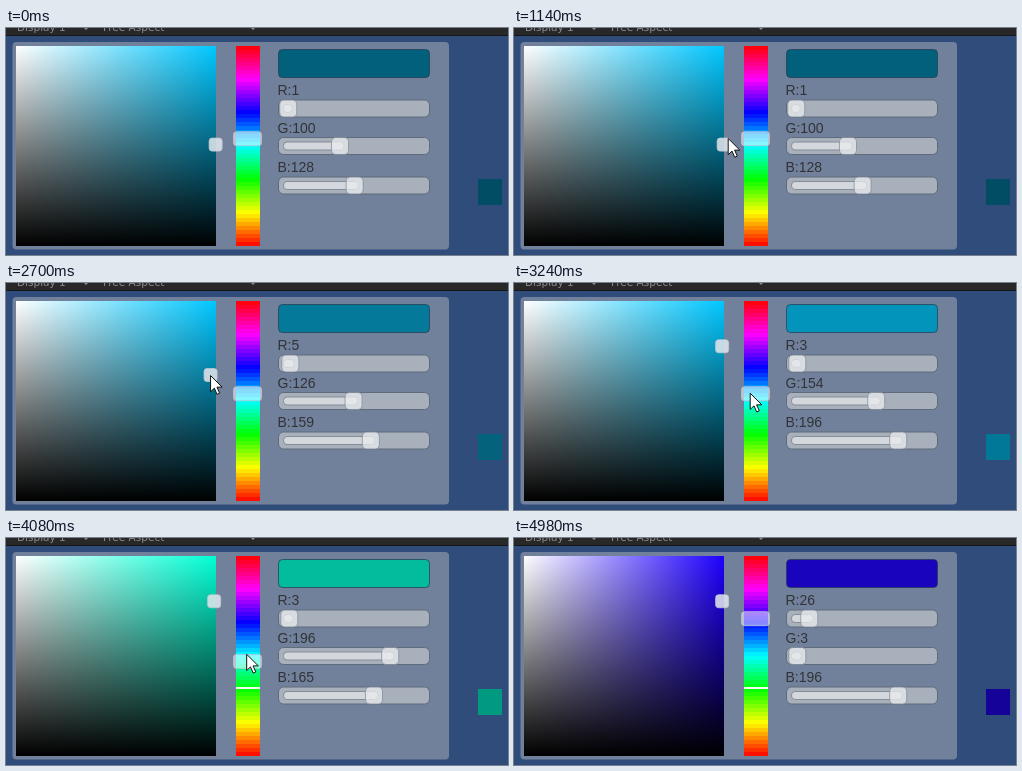
These frames come from a looping animation (502x227 px, 5.4 s). An HTML page:

```html
<!DOCTYPE html>
<html lang="en">
<head>
<meta charset="utf-8">
<title>Color picker</title>
<style>
  html, body { margin: 0; width: 100%; height: 100%; overflow: hidden; background: #304c7a; }
  svg { display: block; width: 502px; height: 227px; }
  text { font: 14px "Liberation Sans", Arial, sans-serif; fill: #323338; }
  .bar text { font: 10.5px "DejaVu Sans", sans-serif; fill: #8c8c8c; }
  .track { fill: #a8b0bb; stroke: #5f6b7b; }
  .fill { fill: #d4d7db; stroke: #858d98; }
  .knob { fill: #e9ecef; fill-opacity: .75; stroke: #7d8794; stroke-opacity: .7; }
  .handle { fill: #dfe4ea; fill-opacity: .88; stroke: #c3cad3; stroke-opacity: .8; }
  #hueKnob { fill: #fff; fill-opacity: .53; stroke: #b9c6d4; }
</style>
</head>
<body>
<svg viewBox="0 0 502 227">
  <defs>
    <linearGradient id="white"><stop stop-color="#fff"/><stop offset="1" stop-color="#fff" stop-opacity="0"/></linearGradient>
    <linearGradient id="black" x2="0" y2="1"><stop stop-opacity="0"/><stop offset="1"/></linearGradient>
  </defs>
  <rect width="502" height="227" fill="#304c7a"/>
  <g class="bar">
    <rect width="502" height="8" fill="#282828"/>
    <rect y="7" width="502" height="1" fill="#161616"/>
    <text x="11" y="3">Display 1</text>
    <text x="97" y="3">Free Aspect</text>
    <path d="M78 0h4l-2 2zM245 0h4l-2 2z" fill="#8c8c8c"/>
  </g>
  <rect x="6.5" y="14" width="436.5" height="207.5" rx="4" fill="#71819b"/>
  <rect id="hueBase" x="10" y="18" width="200" height="200"/>
  <rect x="10" y="18" width="200" height="200" fill="url(#white)"/>
  <rect x="10" y="18" width="200" height="200" fill="url(#black)"/>
  <g id="hueBar" shape-rendering="crispEdges"></g>
  <rect id="trace" x="230" y="149" width="24" height="2" fill="#f2fdf0"/>
  <rect id="preview" x="272.5" y="21.5" width="151" height="28" rx="4" stroke="#26384f" stroke-opacity=".7"/>
  <g id="sliders"></g>
  <rect id="cube" x="472" y="151" width="24" height="26"/>
  <rect id="hueKnob" class="handle" x="227.5" y="-7" width="28" height="14" rx="3"/>
  <rect id="knob" class="handle" x="-6.5" y="-6.5" width="13" height="13" rx="3"/>
  <path id="cursor" d="M.5.5v16.2l3.8-3.6 2.7 6.2 2.6-1.2-2.7-6h5.2z" fill="#fff" stroke="#111"/>
</svg>
<script>
const LOOP = 5400, STEP = 60, TOP = 18, LEFT = 10, SIZE = 200;
const $ = id => document.getElementById(id);
const clamp = (v, lo, hi) => Math.min(hi, Math.max(lo, v));

// Pointer moves: start time, end time, destination x and y.
const moves = [
  [120, 720, 163, 113],        // enter
  [720, 960, 213, 111],        // reach the square's handle
  [1620, 1980, 153.24, 101.92], [1980, 2220, 174, 79], [2220, 2580, 203.35, 93.06],
  [2700, 2940, 206.94, 64.27], // drag ends
  [3120, 3240, 235, 110.73],   // reach the hue handle
  [3360, 3600, 235, 140.8], [3840, 4140, 240, 114], [4260, 4380, 242, 92.96],
  [4380, 4560, 243, 80.69],    // drag ends
  [4620, 4860, 410, 72]        // leave
];

function pointerAt(t) {
  let x = 490, y = 42;
  for (const [from, to, toX, toY] of moves) {
    const p = clamp((t - from) / (to - from), 0, 1), ease = p * p * (3 - 2 * p);
    x += (toX - x) * ease;
    y += (toY - y) * ease;
  }
  return [x, y];
}

// Handles follow the pointer one step late while dragged.
const pickedAt = t => t < 1740 ? [208.44, 117.61] : pointerAt(Math.min(t, 3000) - STEP);
const hueYAt = t => pointerAt(clamp(t, 3360, 4620) - STEP)[1];

function hsv(hue, s, v) {
  return [5, 3, 1].map(n => {
    const k = (n + hue / 60) % 6;
    return Math.round(255 * v * (1 - s * clamp(Math.min(k, 4 - k), 0, 1)));
  });
}
const css = (rgb, shade = 1) => `rgb(${rgb.map(c => Math.round(c * shade)).join()})`;
const hueFromY = y => 360 * (1 - (y - TOP) / SIZE);
const place = (el, x, y) => el.setAttribute("transform", `translate(${x} ${y})`);
const show = (el, on) => el.style.display = on ? "" : "none";

let bands = "";
for (let y = TOP; y < TOP + SIZE; y += 4)
  bands += `<rect x="230" y="${y}" width="24" height="4" fill="${css(hsv(hueFromY(y + 2), 1, 1))}"/>`;
$("hueBar").innerHTML = bands;

const sliders = [["R", 80.5], ["G", 118], ["B", 157.5]].map(([name, y]) => {
  const g = document.createElementNS("http://www.w3.org/2000/svg", "g");
  g.innerHTML = `<text x="271.5" y="${y - 13.5}"></text>
    <rect class="track" x="272.5" y="${y - 8.5}" width="151" height="17" rx="5"/>
    <rect class="fill" x="277.5" y="${y - 4}" height="8" rx="3.5"/>
    <rect class="knob" y="${y - 8.5}" width="17" height="17" rx="4"/>`;
  $("sliders").append(g);
  const [label, , fill, knob] = g.children;
  return value => {
    const x = 281.7 + 0.523 * value;
    label.textContent = `${name}:${value}`;
    fill.setAttribute("width", x - 273.5);
    knob.setAttribute("x", x - 8.5);
  };
});

function draw(now) {
  const t = Math.floor(now % LOOP / STEP) * STEP;
  const [x, y] = pickedAt(t), hueY = hueYAt(t), hue = hueFromY(hueY);
  const rgb = hsv(hue, (x - LEFT) / SIZE, 1 - (y - TOP) / SIZE);

  $("hueBase").setAttribute("fill", css(hsv(hue, 1, 1)));
  $("preview").setAttribute("fill", css(rgb, 0.96));
  $("cube").setAttribute("fill", css(rgb, 0.78));
  sliders.forEach((set, i) => set(rgb[i]));
  place($("knob"), x + 1.2, y - 1);
  place($("hueKnob"), 0, hueY);
  const [px, py] = pointerAt(t);
  place($("cursor"), px + 0.7, py - 1);
  show($("cursor"), t >= 180 && t < 4860);
  show($("trace"), t >= 4020);
}

const start = performance.now();
function tick() {
  draw(performance.now() - start);
  requestAnimationFrame(tick);
}
tick();
</script>
</body>
</html>
```
